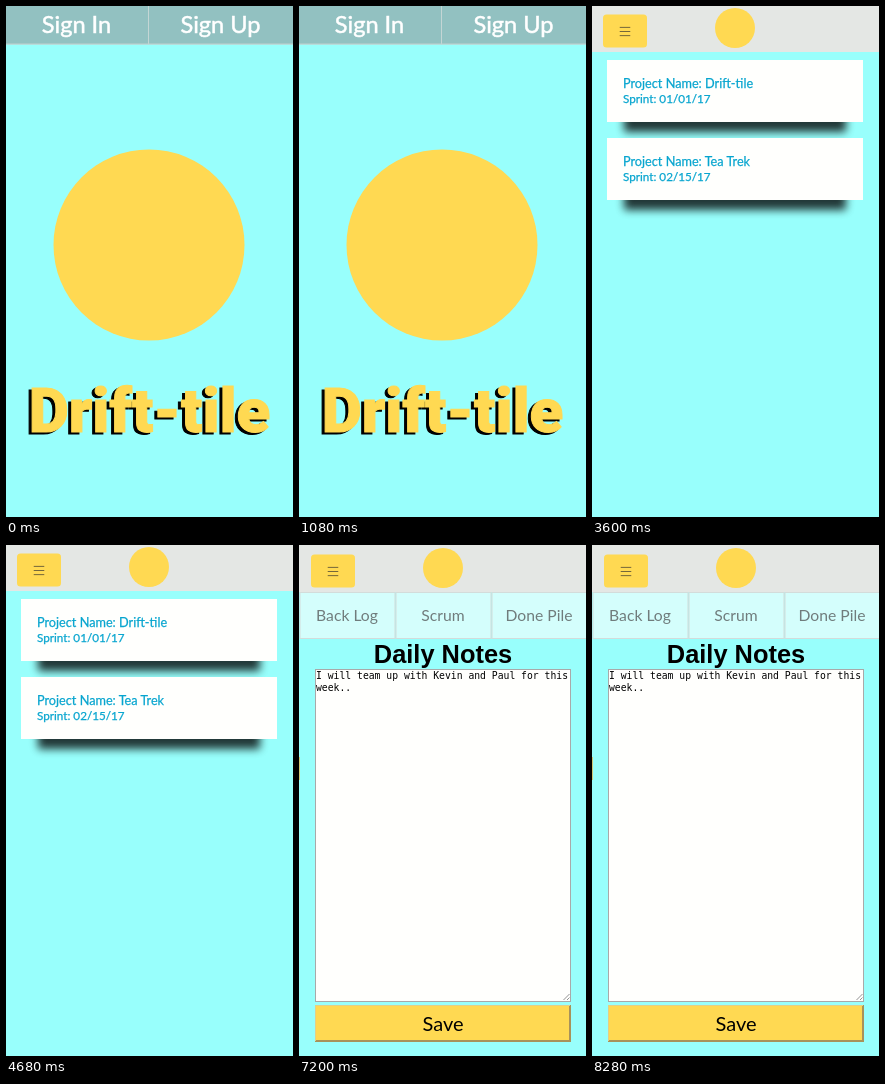
An HTML page that plays this animation: 287 px wide and 511 px high, repeating every 9 s.

```html
<!DOCTYPE html>
<html lang="en">
<head>
<meta charset="utf-8">
<title>Project app tour</title>
<style>
html, body { margin: 0; width: 100%; height: 100%; overflow: hidden; background: #98fffc; }
svg { display: block; width: 287px; height: 511px; font-family: Lato, "Open Sans", sans-serif; }
.bold { font-weight: 700; }
.mid { text-anchor: middle; }
.title { font-family: Roboto, sans-serif; font-weight: 900; }
.head { font-family: "Liberation Sans", sans-serif; font-weight: 700; }
.mono { font-family: "DejaVu Sans Mono", monospace; }
.drop { filter: drop-shadow(4px 5px 3px rgba(0, 0, 0, .45)); }
.blur { filter: blur(4px); }
</style>
</head>
<body>
<svg id="stage" viewBox="0 0 287 511"></svg>
<script>
const HOLD = 1800;
const YELLOW = '#ffd952', CYAN = '#98fffc', PANEL = '#e4e7e4', BAR = '#92c1c1';
const APP = 'Drift-tile';

const rect = (x, y, w, h, fill, more = '') =>
  `<rect x="${x}" y="${y}" width="${w}" height="${h}" fill="${fill}" ${more}/>`;
const text = (x, y, size, str, fill = '#000', cls = '', more = '') =>
  `<text x="${x}" y="${y}" font-size="${size}" fill="${fill}" class="${cls}" ${more}>${str}</text>`;
const path = (d, stroke, width = 1) =>
  `<path d="${d}" fill="none" stroke="${stroke}" stroke-width="${width}"/>`;
const logo = (x, y, r) => `<circle cx="${x}" cy="${y}" r="${r}" fill="${YELLOW}"/>`;

function menu(x, y, w, h) {
  const cx = x + w / 2, cy = y + h / 2 + .5, half = w * .12, gap = h * .125;
  const lines = [-gap, 0, gap].map(d => `M${cx - half} ${cy + d}h${half * 2}`).join('');
  return rect(x, y, w, h, YELLOW, 'rx="3.5"') + path(lines, '#74663a', w / 44);
}

const header = (x, y) =>
  rect(0, 0, 287, 46 + x, PANEL) + menu(11 + x, 8.5 + y, 44, 33) + logo(143 + x, 22 + y, 20);

function tabs(x, y) {
  return ['Back Log', 'Scrum', 'Done Pile'].map((name, i) =>
    rect(x + i * 96 + .5, y + .5, 95, 46, '#d4fefc', 'stroke="#d3dcda"') +
    text(x + 47.5 + i * 96, y + 29, 15.7, name, '#707c7c', 'mid')).join('');
}

const topBar = () =>
  rect(0, 0, 287, 38, BAR) + rect(142, 0, 1, 38, '#c4d6d5') + rect(0, 37.5, 287, 1.2, '#c4d0cf');

function welcome() {
  const white = 'stroke="#fff" stroke-width=".5"';
  const name = (x, y, fill) =>
    text(x, y, 62, APP, fill, 'title mid', `stroke="${fill}"`);
  return topBar() +
    text(70.5, 27, 23.6, 'Sign In', '#fff', 'mid', white) +
    text(214.5, 27, 23.6, 'Sign Up', '#fff', 'mid', white) +
    logo(143, 239, 95.5) + name(140.5, 428, '#000') + name(143.5, 426, YELLOW);
}

function form() {
  const fields = [
    ['Project Name:', '"best app ever!"', 11.2], ['Start Date:', '01/01/17', 10.5],
    ['End Date:', '01/01/17', 10.5], ['Project Leader:', '"Big Boss"', 11.2],
    ['Scrum Master:', '"me"', 11.2], ['Add Member:', 'Kevin', 11.5]
  ];
  const rows = fields.map(([label, hint, size], i) => {
    const y = 85 + i * 58.3;
    return text(19.5, y - 7, 7.8, label, '#000', 'bold') +
      rect(20, y, 249, 29, '#f0f3ef') + rect(20, y + 29, 249, 1, '#777a77') +
      text(24, y + 19, size, hint, '#a2a5a2');
  }).join('');
  return topBar() + rect(0, 6, 287, 45.5, PANEL) + rect(0, 51, 287, 1, '#d5dcd9') +
    menu(8, 12, 28, 21) + logo(144, 28.5, 20.5) + rect(0, 124, 1, 14, '#8fc4c6') +
    rect(11.5, 56.5, 266, 430, '#e3e6e3', 'rx="7" stroke="#f5f3e4" stroke-width="1.5"') +
    rows + rect(207, 376, 62, 29.5, YELLOW) + text(238, 393, 6.3, 'ADD', '#333', 'mid') +
    text(19.5, 428, 7.8, 'Team Members:', '#000', 'bold') + text(24, 446, 11.5, 'Kevin') +
    rect(20, 455, 249, 21, YELLOW) + path('M20 475.5H268.5V455', '#77705a') +
    path('M20.5 476V455.5H269', '#d9ca96', .8) +
    text(144, 470, 11.8, 'Create Project', '#000', 'mid');
}

function projects() {
  const cards = [[54, APP, '01/01/17'], [132, 'Tea Trek', '02/15/17']];
  const line = (y, size, str) =>
    text(31, y, size, str, '#07a5cf', '', 'stroke="#07a5cf" stroke-width=".25"');
  return header(0, 0) + cards.map(([y, name, date]) =>
    rect(32, y + 30, 222, 42, '#000', 'class="blur" opacity=".78"') +
    rect(15, y, 256, 62, '#fffffd') +
    line(y + 27.5, 12.7, 'Project Name: ' + name) +
    line(y + 43, 11.7, 'Sprint: ' + date)).join('');
}

function board() {
  const panel = (y, name, ty) =>
    rect(17.5, y, 251, 348, PANEL, 'rx="6" class="drop"') +
    text(143, ty, 17.5, name, '#000', 'bold mid');
  const arrow = (x, dir) =>
    `<circle cx="${x}" cy="177" r="14.2" fill="${YELLOW}" stroke="#777a70" stroke-width="1.5"/>` +
    path(`M${x - 5 * dir} 178h${10 * dir}m${-3 * dir} -2.5l${3 * dir} 2.5l${-3 * dir} 2.5`, '#333');
  return header(0, 0) + tabs(-.5, 46) +
    rect(95.5, 45.5, 95.5, 48, 'none', 'stroke="#d9aa68" stroke-width="1.2"') +
    panel(112, 'Tasks', 138) + text(33.5, 185, 19.2, 'User can sign in') +
    rect(26, 196, 234, 1.6, '#a9aca9') + arrow(209, -1) + arrow(240, 1) +
    panel(488, 'Dev', 513);
}

function notes() {
  return header(1, 1) + tabs(.5, 47) + rect(0, 212, 1, 23, '#d0c878') +
    text(144, 118, 25.4, 'Daily Notes', '#000', 'head mid') +
    rect(16.5, 124.5, 255, 332, '#fffffd', 'stroke="#a9a9a9"') +
    text(17, 134, 9.74, 'I will team up with Kevin and Paul for this', '#000', 'mono') +
    text(17, 146, 9.74, 'week..', '#000', 'mono') +
    path('M264.5 455l6 -6M268 455l2.5 -2.5', '#777', .8) +
    rect(16, 460, 256, 37, YELLOW) + path('M16 496H271V460', '#a8925a', 2) +
    path('M16.5 496V460.5H271', '#e3cf88') +
    text(144, 486, 20, 'Save', '#000', 'mid');
}

const stage = document.getElementById('stage');
stage.innerHTML = rect(0, 0, 287, 511, CYAN) +
  [welcome, form, projects, board, notes].map(draw => `<g>${draw()}</g>`).join('');
const screens = [...stage.querySelectorAll('g')];
const start = performance.now();

function tick() {
  const now = Math.floor((performance.now() - start) / HOLD) % screens.length;
  screens.forEach((g, i) => g.style.display = i === now ? '' : 'none');
  requestAnimationFrame(tick);
}
tick();
</script>
</body>
</html>
```
